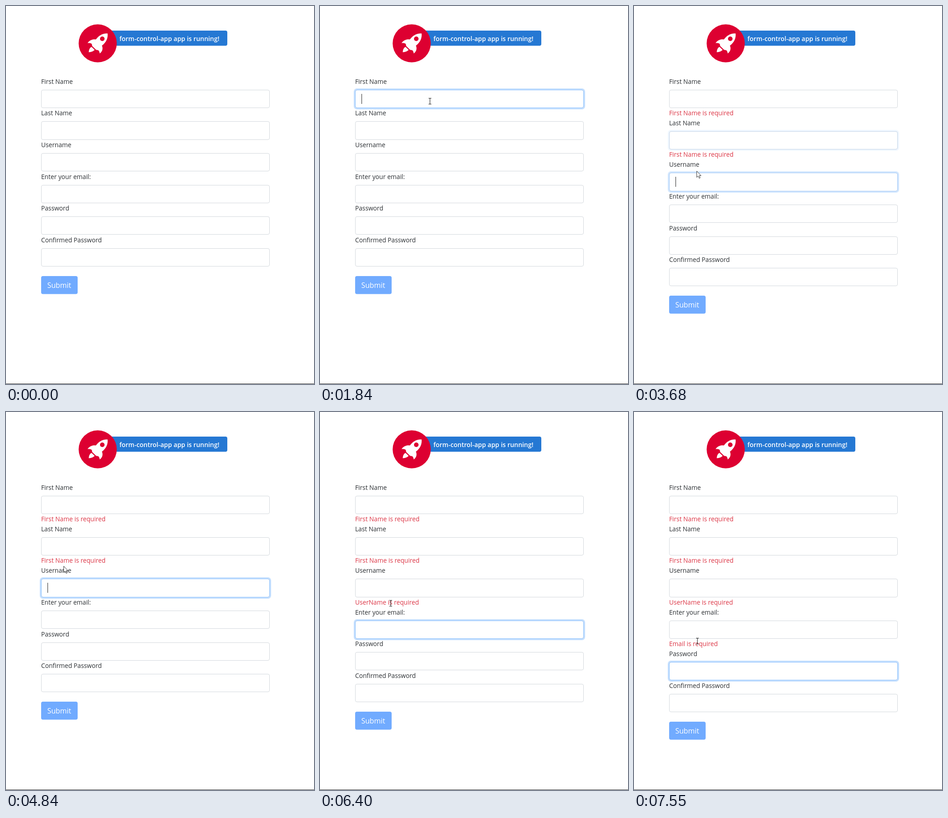
Write an HTML page that moves like this. It is 675x830 px and loops after 8000 ms.

```html
<!DOCTYPE html>
<html lang="en">
<head>
<meta charset="utf-8">
<title>Form validation</title>
<style>
  html, body { margin: 0; width: 100%; height: 100%; overflow: hidden; background: #fff; }
  svg { display: block; }
  text { font-family: "Open Sans", "Noto Sans", sans-serif; font-size: 13.7px; fill: #2b2f33; }
  .error { fill: #dc3545; }
  .submit { font-size: 15.8px; font-weight: 500; fill: #fff; }
  .badge { font-size: 13.95px; font-weight: 600; fill: #fff; }
</style>
</head>
<body>
<svg width="675" height="830" viewBox="0 0 675 830">
  <rect x="200" y="54" width="285" height="33.3" rx="4" fill="#2578d3"/>
  <text class="badge" x="248.5" y="76.5">form-control-app app is running!</text>
  <circle cx="201" cy="82" r="41.8" fill="#dd0031"/>
  <g fill="#fff">
    <path d="M222.6 60.3C212 59.5 203 65 197 73.6C190 72.5 183 75 178.8 81.6C183 80.8 186.5 81.5 188 83.5L189 88L197.5 96.2L202 97C204 98.5 205 101 205.5 104.2C211.5 100 213 93 210.2 87C219 80.5 224 71 222.6 60.3Z"/>
    <path d="M187.5 89.8C183.5 91.5 181.6 96 181.4 101.4C187 101.4 191.5 99.5 194.2 96.2Z"/>
  </g>
  <circle cx="211" cy="72" r="5" fill="#dd0031"/>
  <g id="form"></g>
  <g id="button">
    <rect x="77" y="593" width="80" height="39.5" rx="4" fill="#71abff"/>
    <text class="submit" x="90.5" y="619">Submit</text>
  </g>
  <rect y="829" width="675" height="1" fill="#3c3c3c"/>
  <path id="arrow" d="M.5 .5V14.2L3.7 11.3L5.9 16.3L8.1 15.3L6 10.5H10Z" fill="#fff" stroke="#222" stroke-width=".9"/>
  <path id="beam" d="M-3 -6.5H-.8L0 -5.7L.8 -6.5H3M0 -5.7V5.7M-3 6.5H-.8L0 5.7L.8 6.5H3" fill="none" stroke="#222" stroke-width="1.1"/>
</svg>
<script>
const LOOP = 8000, ENTER = 510, FADE = 150, BLINK = 510;
const PITCH = 69.55, ERROR_LINE = 21.73;

// Each field is focused by a click; leaving it empty shows its message.
const fields = [
  { label: "First Name", message: "First Name is required", focus: 1600 },
  { label: "Last Name", message: "First Name is required", focus: 2500 },
  { label: "Username", message: "UserName is required", focus: 3580 },
  { label: "Enter your email:", message: "Email is required", focus: 5600 },
  { label: "Password", message: "", focus: 7000 },
  { label: "Confirmed Password", message: "", focus: Infinity }
];
fields.forEach((f, i) => f.blur = fields[i + 1]?.focus ?? Infinity);

// Places where the pointer comes to rest; the glides follow from the distances.
const stops = [
  { at: ENTER, x: 638, y: 804 },
  { at: 1280, x: 239, y: 227 },
  { at: 1520, x: 241, y: 209 },
  { at: 2480, x: 160, y: 280 },
  { at: 2890, x: 146, y: 300 },
  { at: 3370, x: 137, y: 362 },
  { at: 4610, x: 131, y: 299 },
  { at: 4840, x: 126, y: 338 },
  { at: 5480, x: 158, y: 450 },
  { at: 6170, x: 155, y: 420 },
  { at: 6880, x: 145, y: 542 },
  { at: 7540, x: 139, y: 503 }
];

const byId = id => document.getElementById(id);
const smooth = v => {
  const k = Math.max(0, Math.min(1, v));
  return k * k * (3 - 2 * k);
};

function set(el, attrs) {
  for (const name in attrs) el.setAttribute(name, attrs[name]);
}
function add(tag, attrs, text = "") {
  const el = document.createElementNS("http://www.w3.org/2000/svg", tag);
  set(el, attrs);
  el.textContent = text;
  return byId("form").appendChild(el);
}
function show(el, on) {
  el.style.visibility = on ? "visible" : "hidden";
}

for (const f of fields) {
  const outline = { x: 77.5, width: 500, rx: 3.6, fill: "none" };
  f.ring = add("rect", { x: 75.5, width: 504, rx: 5.5, fill: "none", stroke: "#c4dffe", "stroke-width": 3 });
  f.box = add("rect", { ...outline, fill: "#fff", stroke: "#d3d8dd" });
  f.active = add("rect", { ...outline, stroke: "#8fc2fe" });
  f.caret = add("rect", { x: 91, width: 1, height: 22, fill: "#222" });
  f.title = add("text", { x: 77 }, f.label);
  f.error = add("text", { x: 77, class: "error" }, f.message);
}

function pointerAt(t) {
  let { x, y, at: left } = stops[0];
  for (const stop of stops.slice(1)) {
    const dx = stop.x - x, dy = stop.y - y;
    const glide = Math.min(stop.at - left, 200 + .8 * Math.hypot(dx, dy));
    const k = smooth((t - stop.at + glide) / glide);
    x += dx * k;
    y += dy * k;
    if (k < 1) break;
    left = stop.at;
  }
  return { x: Math.round(x), y: Math.round(y) };
}

function render(t) {
  const pointer = pointerAt(t);
  let shift = 0, overText = false;

  fields.forEach((f, i) => {
    const y = i * PITCH + shift;
    const top = Math.round(183.9 + y), bottom = Math.round(223.1 + y), height = bottom - top;
    const focused = t >= f.focus && t < f.blur;
    const failed = t >= f.blur && f.message !== "";
    const glow = smooth((t - f.focus) / FADE) * (1 - smooth((t - f.blur) / FADE));

    set(f.ring, { y: top - 1.5, height: height + 4, opacity: glow });
    set(f.box, { y: top + .5, height });
    set(f.active, { y: top + .5, height, opacity: glow });
    set(f.caret, { y: top + 9 });
    set(f.title, { y: Math.round(170.9 + y) });
    set(f.error, { y: Math.round(240.2 + y) });
    show(f.caret, focused && Math.floor((t - f.focus) / BLINK) % 2 === 0);
    show(f.error, failed);

    const inBox = pointer.y >= top && pointer.y <= bottom && pointer.x < 578;
    const inError = failed && pointer.y > bottom && pointer.y < bottom + 22.5 && pointer.x < 219;
    overText ||= inBox || inError;
    if (failed) shift += ERROR_LINE;
  });

  set(byId("button"), { transform: `translate(0 ${Math.round(shift)})` });
  for (const id of ["arrow", "beam"]) {
    set(byId(id), { transform: `translate(${pointer.x} ${pointer.y})` });
    show(byId(id), t >= ENTER && overText === (id === "beam"));
  }
}

const start = performance.now();
function tick() {
  render((performance.now() - start) % LOOP);
  requestAnimationFrame(tick);
}
tick();
</script>
</body>
</html>
```
